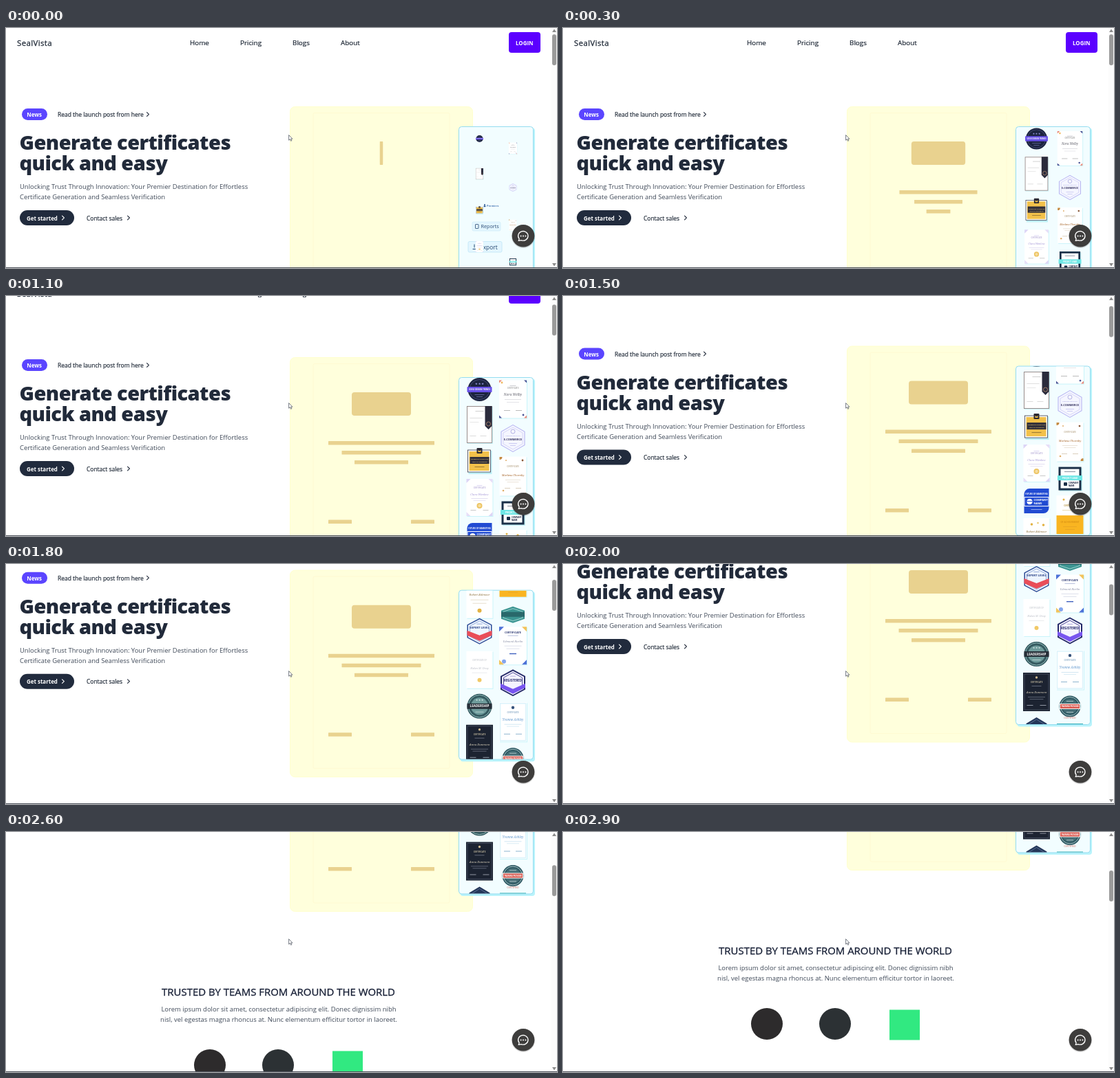
These frames come from a looping animation (800 px wide and 349 px high, 3 s). An HTML page:

```html
<!DOCTYPE html>
<html lang="en">
<head>
<meta charset="utf-8">
<title>Certificates landing page</title>
<style>
  html, body { margin: 0; width: 100%; height: 100%; overflow: hidden; background: #fff; }
  svg { display: block; width: 100vw; height: 100vh; font-family: "Open Sans", "Noto Sans", sans-serif; }
</style>
</head>
<body>
<svg id="stage" viewBox="0 0 800 349" preserveAspectRatio="none"></svg>
<script>
const LOOP = 3000, STEP = 100;
const INK = '#212a3a', GRAY = '#3f4958', NAVY = '#1c2440', GOLD = '#e9d28f';

const rect = (x, y, w, h, fill, r = 0, extra = '') =>
  `<rect x="${x}" y="${y}" width="${w}" height="${h}" rx="${r}" fill="${fill}" ${extra}/>`;
const circle = (x, y, r, fill, extra = '') =>
  `<circle cx="${x}" cy="${y}" r="${r}" fill="${fill}" ${extra}/>`;
const path = (d, fill, extra = '') => `<path d="${d}" fill="${fill}" ${extra}/>`;
const line = (d, color, width) =>
  path(d, 'none', `stroke="${color}" stroke-width="${width}" stroke-linecap="round" stroke-linejoin="round"`);
const outline = (color, w) => `stroke="${color}" stroke-width="${w}"`;
const text = (x, y, size, str, fill = INK, weight = 400, extra = '') =>
  `<text x="${x}" y="${y}" font-size="${size}" font-weight="${weight}" fill="${fill}" ${extra}>${str}</text>`;
// Medium weight: regular glyphs with a hairline stroke
const medium = (x, y, size, str, fill = INK, extra = '') =>
  text(x, y, size, str, fill, 400, outline(fill, size * 0.022) + ' ' + extra);
const label = (y, size, str, fill, weight = 600, extra = '') =>
  text(0, y, size, str, fill, weight, 'text-anchor="middle" ' + extra);
const chevron = (x, y, color) => line(`M${x - 1.5} ${y - 2.8}l2.9 2.8l-2.9 2.8`, color, 1.1);
const bar = (y, w, color, h = 0.7) => rect(-w / 2, y, w, h, color);

function hexagon(rx, ry, fill, extra) {
  const h = ry / 2;
  return path(`M0 ${-ry}L${rx} ${-h}V${h}L0 ${ry}L${-rx} ${h}V${-h}Z`, fill, extra);
}
function paper(w, h, fill = '#fff') {
  return rect(-w / 2 + 1, -h / 2 + 1, w, h, '#c9f4fa') + rect(-w / 2, -h / 2, w, h, fill);
}
function corners(w, h, a, b, size = 5) {
  const x = w / 2, y = h / 2;
  return path(`M${-x} ${-y}h${size}l${-size} ${size}zM${x} ${y}h${-size}l${size} ${-size}z`, a) +
         path(`M${x} ${-y}h${-size}l${size} ${size}zM${-x} ${y}h${size}l${-size} ${-size}z`, b);
}
const script = (y, str, fill, size = 4) =>
  label(y, size, str, fill, 400, 'font-style="italic" font-family="Noto Serif, serif"');

// Small certificates and badges, centred on 0,0
const left = [
  [161, circle(0, 0, 17, NAVY) + circle(0, 0, 14.5, 'none', outline('#5a6090', 0.6)) +
    label(-7, 4, '★ ★ ★', '#8f92d8') + rect(-18, -4, 36, 8, '#6750e8', 1) +
    label(1, 2.8, 'UX/UI DESIGN TRENDS', '#fff', 700) + bar(7, 14, '#777cb5') + bar(10, 9, '#777cb5')],
  [212, paper(37, 54) + rect(-18, -26.5, 36, 53, 'none', 0, outline('#8d807f', 0.9)) +
    path('M8 -27h10v29l-5 5l-5 -5z', '#2a2b3c') + circle(13, -1, 3, 'none', outline('#b98f70', 0.8)) +
    bar(-20, 12, '#bbb') + rect(-14, -10, 18, 0.7, '#d0d0d0') + rect(-14, -4, 13, 0.7, '#ddd') +
    rect(-14, 16, 9, 0.7, '#ccc') + rect(1, 16, 9, 0.7, '#ccc')],
  [265, rect(-16, -15, 34, 34, '#bdeff7') + rect(-17, -16, 33, 32, '#fff', 0, outline('#3a3a48', 0.8)) +
    rect(-15, -14, 29, 28, '#f2c14a') + rect(-4, -19, 8, 8, '#2b2932', 1) + path('M-2 -13v-3l2 1.5l2 -1.5v3z', '#f2c14a') +
    rect(-14, -6, 28, 10, '#32303a') + label(-1.6, 2.1, 'LEADERSHIP COURSE FOR', '#f4cf72') +
    label(2, 2.1, 'TEAM OF TOMORROW', '#f4cf72') + bar(8, 14, '#755b2d')],
  [318, paper(38, 54) + corners(38, 54, '#dcd5f6', '#e6def8', 6) + label(-13, 3, 'CERTIFICATE', '#b1a6d5') +
    bar(-18, 8, '#cfc6ee') + script(-3, 'Clara Wenlow', '#a598d7') + bar(1, 24, '#d7d2ed') + bar(4, 18, '#ded9f0') +
    circle(0, 12, 4, '#edc462') + circle(0, 12, 2.2, '#f6dda0') + rect(-13, 18, 8, 0.8, '#bbb') + rect(5, 18, 8, 0.8, '#bbb')],
  [373, path('M-18 -10a8 8 0 0 1 8-8H18V10a8 8 0 0 1-8 8H-18Z', '#214bd2') +
    label(-9, 2.8, 'FUTURE OF MARKETING', '#fff', 700) + rect(-18, -6, 36, 14, '#fff') +
    rect(-17, -5, 34, 12, '#214bd2') + circle(-10, 1, 4, '#fff') + rect(-14, 0, 8, 1, '#214bd2') +
    text(-4, 0, 4, 'COMPANY', '#fff', 700) + text(-4, 5, 4, 'NAME', '#fff', 700) + bar(12, 16, '#c2d0ff')],
  [425, paper(38, 54) + circle(-7, -18, 1.8, '#e2b243') + circle(2, -20, 1.3, '#e9c971') + circle(10, -17, 1.8, '#e2b243') +
    script(-6, 'Robert Aldmoor', '#8c713c') + bar(0, 26, '#ddd1b7') + bar(5, 20, '#ddd1b7') + circle(0, 16, 3, '#e2b243')],
  [471, hexagon(18, 19, '#2b4b96') + hexagon(16.5, 17.4, '#eef5ff') + hexagon(14, 15, 'none', outline('#6f8dc9', 0.7)) +
    label(-4, 4.2, 'EXPERT LEVEL', '#213b80', 700) + path('M-18 -1L0 6L18 -1V6L0 14L-18 6Z', '#e94d58') + bar(-11, 8, '#7d96ca')],
  [527, paper(38, 54) + label(-13, 2.8, 'CERTIFICATE OF', '#c7cbd1') + script(-1, 'Helen M. Dray', '#bbbfc8') +
    bar(4, 22, '#e1e3e7') + circle(0, 15, 3, '#f1c967')],
  [580, circle(0, 0, 18, '#355a60') + circle(0, 0, 16.2, 'none', outline('#9cc7c4', 0.9)) +
    circle(0, 0, 12.5, '#6f9c9c') + rect(-18, -4, 36, 8, '#272f38') + label(1.7, 4.6, 'LEADERSHIP', '#fff', 700) +
    label(-8, 3.4, '★ ★ ★', '#dceceb') + bar(8, 12, '#d5e6e4')],
  [635, rect(-19.5, -28, 39, 56, '#1c2331') + rect(-17.5, -26, 35, 52, 'none', 0, outline('#596276', 0.6)) +
    circle(0, -21, 1.7, '#ccb78a') + label(-13, 3, 'CERTIFICATE', '#d4c8a9') + bar(-9, 14, '#7c8292') +
    script(2, 'Anna Dunmore', '#d8cfb8', 4.2) + bar(7, 25, '#747b8b') + bar(10, 20, '#747b8b') +
    rect(-14, 19, 9, 1, '#9197a4') + rect(5, 19, 9, 1, '#9197a4')],
  [690, hexagon(15, 18, '#24375a') + hexagon(12, 15, 'none', outline('#7287a8', 0.7)) +
    label(-5, 3.6, 'APPROVED', '#fff', 700) + rect(-15, -2, 30, 7, '#40587f')]
];

const right = [
  [175, paper(40, 55) + corners(40, 55, '#e9897a', '#4a5596', 4) + circle(-16, -24, 1.4, '#f0b85c') + circle(15, 23, 1.4, '#4a5596') +
    bar(-20, 9, '#b6b6be') + label(-15, 2.8, 'CERTIFICATE', '#999') + script(-5, 'Nora Welby', '#63636e', 4.8) +
    bar(0, 24, '#d1d1d7') + bar(4, 18, '#d9d9df') + rect(-13, 16, 9, 0.8, '#aaa') + rect(4, 16, 9, 0.8, '#aaa')],
  [232, hexagon(17.5, 20, '#b1aff0') + hexagon(16.5, 19, '#f5f6ff') + hexagon(14, 16, 'none', outline('#c9c7f4', 0.7)) +
    circle(0, -10, 3, 'none', outline('#a5a3dd', 0.8)) + label(-3, 2.1, 'CERTIFIED SPECIALIST', '#a5a3dd') +
    label(2.5, 4, 'E-COMMERCE', '#353260', 700) + bar(7, 12, '#bbb9ed') + bar(10, 8, '#bbb9ed')],
  [287, paper(39, 57) + path('M-19.5 -28h4q0 4-4 4zM19.5 28h-4q0-4 4-4z', '#c48a42') +
    circle(14, -23, 1.4, '#8a5a3a') + circle(-10, -23, 1, '#dfad68') + circle(-14, 21, 1.3, '#dfad68') +
    label(-13, 3, 'CERTIFICATE', '#b7a588') + script(0, 'Marlena Thornby', '#a8672c', 4) +
    bar(5, 22, '#e2d7c8') + bar(8, 17, '#e2d7c8') +
    rect(-12, 17, 8, 0.7, '#cbb99f') + rect(4, 17, 8, 0.7, '#cbb99f')],
  [340, rect(-15, -15, 33, 34, '#c9f4fa') + rect(-15, -15, 30, 31, '#fff', 0, outline('#1b3048', 3)) +
    bar(-10, 16, '#5b6678') + rect(-18, -4, 36, 7, '#6ee7e5') + label(1, 3.2, 'PROJECT LEAD', '#fff', 700) +
    rect(-9, 6, 5, 5, '#1b3048', 1) + text(-2, 8.4, 2.8, 'COMPANY', NAVY, 700) + text(-2, 11.6, 2.8, 'NAME', NAVY, 700)],
  [393, paper(39, 56) + circle(-9, -22, 1.5, '#e2b243') + circle(7, -20, 1.8, '#e2b243') +
    label(-12, 3, 'CERTIFICATE', '#ad872b') + bar(-7, 22, '#e1cc8d') + rect(-19.5, 1, 39, 27, '#f9b521') +
    label(12, 3.2, 'OF ACHIEVEMENT', '#d68f14') + bar(17, 20, '#e3a223') + bar(21, 14, '#e3a223')],
  [447, hexagon(17, 12, '#3c9592') + hexagon(14, 9, 'none', outline('#b5e2dd', 0.8)) + rect(-17, -4, 34, 7, '#29686b')],
  [492, paper(40, 55) + corners(40, 55, '#4d72d8', '#f2c45b', 7) + circle(-13, 23, 3, '#84a5ed') +
    label(-18, 4, 'CERTIFICATE', '#303c75', 700) + bar(-15, 15, '#9aa5cf') + script(-5, 'Edmund Harlin', '#8c91a8') +
    bar(0, 25, '#d0d4e4') + bar(4, 19, '#d0d4e4') + bar(11, 10, '#3f60be', 1.4)],
  [546, hexagon(18, 19.5, '#252a68') + hexagon(16, 17.4, '#f4f3ff') + hexagon(13.5, 15, 'none', outline('#4e4a95', 1)) +
    label(-2, 4.4, 'REGISTERED', '#252a68', 700) + path('M-18 1L0 9L18 1V7L0 16L-18 7Z', '#7855ef') + bar(-10, 8, '#a29bd4')],
  [603, paper(40, 57) + rect(-18.5, -27, 37, 54, 'none', 0, outline('#d9f2fb', 1.4)) + circle(0, -21, 2.2, '#36537c') +
    label(-13, 2.9, 'CERTIFICATE', '#7ca0c0') + script(-2, 'Yvonne Ashley', '#5c94cc', 4.5) + bar(3, 25, '#bddced') +
    bar(6, 18, '#c9e4f1') + rect(-13, 17, 9, 1, '#8eb5cf') + rect(4, 17, 9, 1, '#8eb5cf')],
  [656, circle(0, 0, 15.5, '#2f5963') + circle(0, 0, 13.5, 'none', outline('#b1ced0', 0.9)) + circle(0, 0, 11, '#456e76') +
    rect(-15, -4, 30, 8, '#f7f2ef') + rect(-14, -3, 28, 6, '#d9584e') + label(1, 2.5, 'TRAINING PROVIDER', '#fff', 700) +
    bar(-8, 10, '#d4e2e3') + bar(8, 10, '#d4e2e3') + label(18, 3.6, 'CERTIFIED', '#d98c83')],
  [700, rect(-19, -19, 38, 38, '#3bb2ba') + rect(-16, -16, 32, 32, '#e4f8f8')]
];

const place = (items, x) => items.map(([y, art]) =>
  `<g class="badge" data-x="${x}" data-y="${y}">${art}</g>`).join('');

// Yellow placeholder bars: centre x, top, width, height, start time
const bars = [[545, 165, 86, 34, -10], [545, 236, 154, 5.5, 100], [545, 250, 115, 5.5, 150],
              [545, 264, 78, 5.5, 200], [485, 350.5, 34, 5.5, 200], [605, 350.5, 34, 5.5, 200]];

const nav = medium(16, 25.5, 11.5, 'SealVista', '#1f2937', 'letter-spacing=".35"') +
  [[267, 'Home'], [340, 'Pricing'], [416, 'Blogs'], [486, 'About']]
    .map(([x, s]) => medium(x, 25, 9.85, s, '#1f2937')).join('') +
  rect(730, 6, 46, 30, '#5b00ff', 4) + text(740, 24.5, 7.95, 'LOGIN', '#fff', 700);

const hero = rect(23, 117, 37, 17, '#5b45ff', 8.5) + text(30.3, 129, 7.95, 'News', '#fff', 700) +
  medium(75, 129, 8.48, 'Read the launch post from here', '#1f2937') + chevron(206, 125.5, INK) +
  ['Generate certificates', 'quick and easy'].map((s, i) =>
    text(19.5, 177 + 30 * i, 29, s, INK, 800, 'letter-spacing="-.56"')).join('') +
  text(20, 234, 9.43, 'Unlocking Trust Through Innovation: Your Premier Destination for Effortless', GRAY) +
  text(20, 249, 9.43, 'Certificate Generation and Seamless Verification', GRAY) +
  rect(20, 265, 79, 22, '#212b3d', 11) + text(30, 279.5, 7.95, 'Get started', '#fff', 700) + chevron(83, 276, '#fff') +
  medium(117, 279.5, 8.45, 'Contact sales', '#1f2937') + chevron(178, 276, INK);

const card = rect(412.5, 114.5, 265, 300.5, '#ffffdc', 7, outline('#ffffce', 1)) +
  rect(446, 123.5, 198, 279, 'none', 2, outline('#fffad2', 1)) +
  bars.map(([x, y, w, h]) => `<g class="bar">${rect(x - w / 2, y, w, h, GOLD, h > 9 ? 4 : 0.5)}</g>`).join('');

const chips = `<g id="chips">` +
  text(698, 260, 4, 'Premiers', '#2e62a8', 600) + circle(695, 257, 1, '#24508f') + rect(693.5, 258.3, 3, 2, '#24508f', 1) +
  rect(677, 282, 41, 13, '#e3f6ff', 2, outline('#cdebf8', 0.7)) + rect(681.5, 285.5, 4.5, 6, 'none', 0.5, outline('#2a4b73', 0.8)) +
  text(689.5, 291.3, 7.2, 'Reports', '#2a4b73') +
  rect(671, 310.5, 49, 15.5, '#e3f6ff', 2, outline('#bfe6f6', 0.8)) + line('M678 321.5h4M680 315v4', '#24466f', 1) +
  text(688, 321.5, 8.4, 'Export', '#24466f') + `</g>`;

const panel = rect(659.5, 145.5, 108.5, 247, '#b9f3fb', 4) +
  rect(657.5, 143.5, 108, 246, '#f2fdff', 4, outline('#93dcf0', 1)) +
  `<g clip-path="url(#frame)">${chips}<g id="wall">${place(left, 687.5)}${place(right, 736)}</g></g>`;

const middle = 'text-anchor="middle"';
const trusted = medium(395.5, 537.5, 14.93, 'TRUSTED BY TEAMS FROM AROUND THE WORLD', '#1a2238', middle) +
  text(396, 560.5, 9.48, 'Lorem ipsum dolor sit amet, consectetur adipiscing elit. Donec dignissim nibh', GRAY, 400, middle) +
  text(396, 575.5, 9.48, 'nisl, vel egestas magna rhoncus at. Nunc elementum efficitur tortor in laoreet.', GRAY, 400, middle) +
  circle(296, 638.5, 23, '#2d2b2c') + circle(395, 638.5, 23, '#2c3134') + rect(474, 618, 44, 44, '#31e981');

const chat = circle(751, 303, 17, '#000', 'opacity=".16"') + circle(751, 302.3, 16.3, '#3e3d3c') +
  line('M745.2 306.6A7.2 6.8 0 1 1 748 308.6L744.2 309.4Z', '#fff', 1.3) +
  [747.6, 751, 754.4].map(x => circle(x, 302.4, 1, '#fff')).join('');

const chrome = rect(792, 0, 8, 349, '#fcfcfc') + path('M793 6l3-4.5l3 4.5z', '#8b8b8b') + path('M793 342l3 4.5l3-4.5z', '#8b8b8b') +
  rect(793, 9, 6, 45, '#9a9a9a', 3, 'id="thumb"') + rect(0, 348, 800, 1, '#50545d');

const pointer = path('M410.6 155.6v7.6l1.8-1.5l1.2 2.6l1.3-.6l-1.2-2.5h2.2z', '#fff', outline('#555b66', 0.8));

const stage = document.getElementById('stage');
stage.innerHTML = `<defs><clipPath id="frame"><rect x="658" y="144" width="107" height="245" rx="4"/></clipPath></defs>` +
  rect(0, 0, 800, 349, '#fff') +
  `<g id="page">${nav}${hero}${card}${panel}${trusted}</g>${chat}${chrome}${pointer}`;

const byId = id => document.getElementById(id);
const page = byId('page'), wall = byId('wall'), thumb = byId('thumb'), chipBox = byId('chips');
const badges = [...stage.querySelectorAll('.badge')];
const barBoxes = [...stage.querySelectorAll('.bar')];

const clamp = v => Math.max(0, Math.min(1, v));
const easeOut = p => 1 - (1 - clamp(p)) ** 3;
const easeInOut = p => (p = clamp(p), p < 0.5 ? 4 * p ** 3 : 1 - 4 * (1 - p) ** 3);

const scrollKeys = [[900, 0], [1000, 10], [1100, 25], [1200, 36], [1300, 41], [1500, 41.5],
                    [1600, 56], [1700, 80], [2000, 156], [2400, 259.5], [2900, 359.5]];
function track(keys, t) {
  if (t <= keys[0][0]) return keys[0][1];
  for (let i = 1; i < keys.length; i++) {
    const [t0, v0] = keys[i - 1], [t1, v1] = keys[i];
    if (t <= t1) return v0 + (v1 - v0) * (t - t0) / (t1 - t0);
  }
  return keys[keys.length - 1][1];
}

function draw(t) {
  const scroll = track(scrollKeys, t);
  page.setAttribute('transform', `translate(0 ${-scroll})`);
  thumb.setAttribute('y', 9.3 + scroll * 0.13);
  wall.setAttribute('transform', `translate(0 ${-293 * easeInOut((t - 1280) / 720)})`);
  chipBox.setAttribute('opacity', clamp(1 - t / 300));

  const size = 0.3 + 0.7 * easeOut(t / 600);
  for (const b of badges)
    b.setAttribute('transform', `translate(${b.dataset.x} ${b.dataset.y}) scale(${size})`);
  bars.forEach(([x, , , , start], i) => {
    const k = easeOut((t - start) / 560);
    barBoxes[i].setAttribute('transform', `translate(${x * (1 - k)} 0) scale(${k} 1)`);
  });
}

const begin = performance.now();
function tick() {
  const t = (performance.now() - begin) % LOOP;
  draw(Math.floor(t / STEP) * STEP);
  requestAnimationFrame(tick);
}
tick();
</script>
</body>
</html>
```
